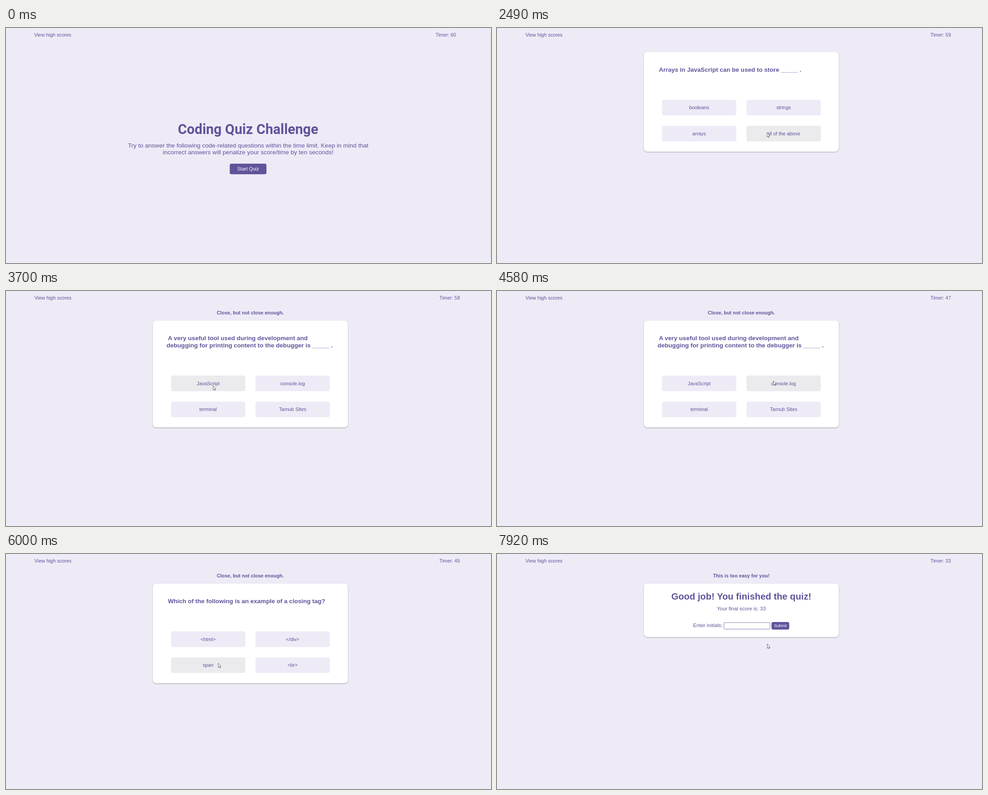
Animation, 1074 px wide and 521 px high, one loop 7.99 s. Source, as an HTML page:

```html
<!DOCTYPE html>
<html lang="en">
<head>
<meta charset="utf-8">
<title>Coding Quiz</title>
<style>
  html, body { margin: 0; width: 100%; height: 100%; overflow: hidden; background: #eeebf7; }
  svg { display: block; width: 1074px; height: 521px; font: 10.88px "Liberation Sans", Arial, sans-serif; fill: #61539a; }
  .bold { font-weight: 700; }
  .mid { text-anchor: middle; }
  .title { font: 700 30.5px Roboto, "Liberation Sans", sans-serif; }
  .intro, .question { font-size: 13.55px; }
  .done { font-size: 20.3px; }
  .form { font-size: 11.4px; }
  .submit { font-size: 9.07px; }
  .white, .card { fill: #fff; }
  .card { filter: drop-shadow(0 1px 1.2px rgba(0, 0, 0, .32)); }
  .answer { fill: #eeebf7; }
  .answer.hover { fill: #ebebed; }
  .input { fill: #fff; stroke: #8379ad; }
</style>
</head>
<body>
<svg id="stage" viewBox="0 0 1074 521">
  <g id="scene"></g>
  <text id="timer" y="18.7"></text>
  <path id="cursor" d="M0 0V9.6L2.2 7.5L3.7 10.8L5 10.2L3.6 7.1H6.3Z" fill="#fff" stroke="#55515f" stroke-width=".85"/>
</svg>
<script>
const LOOP = 7990;
const BUTTON = { w: 164.5, h: 34.6, xs: [365.4, 552.4], pitch: 57.6 };

const scenes = [
  { at: 0, kind: "start" },
  { at: 1150, lines: ["Arrays in JavaScript can be used to store _____ ."],
    answers: ["booleans", "strings", "arrays", "all of the above"] },
  { at: 2570, message: "This is too easy for you!",
    lines: ["String values must be enclosed within _____", "when being assigned to variables."],
    answers: ["commas", "curly brackets", "quotes", "parentheses"] },
  { at: 3700, message: "Close, but not close enough.",
    lines: ["A very useful tool used during development and", "debugging for printing content to the debugger is _____ ."],
    answers: ["JavaScript", "console.log", "terminal", "Tarnub Sites"] },
  { at: 4960, message: "You're making Web Dev look easy!",
    lines: ["How often should you commit changes to your code?"],
    answers: ["early and often", "never", "once a month", "twice a week"] },
  { at: 6000, message: "Close, but not close enough.",
    lines: ["Which of the following is an example of a closing tag?"],
    answers: ["<html>", "</div>", "span", "<br>"] },
  { at: 7340, kind: "end", message: "This is too easy for you!" }
];

// [time, seconds left]
const ticks = [[0, 60], [2010, 59], [2970, 58], [3960, 47], [4960, 46], [6000, 45], [6950, 34], [7915, 33]];

// [time, x, y] of the pointer tip
const path = [
  [670, 586, 246], [990, 543, 306], [1150, 543, 306], [1940, 592, 236], [2400, 598, 232],
  [2890, 598, 232], [3250, 520, 226], [3610, 458.5, 210], [3700, 458.5, 210], [3900, 468, 209],
  [4490, 609, 199], [4580, 612, 199], [4790, 635.5, 203], [4960, 635.5, 203], [5680, 487, 236],
  [5830, 470, 242], [6160, 470, 242], [6950, 577, 204], [7180, 611, 193], [7340, 611, 193],
  [7590, 590, 198], [7750, 590, 198], [7915, 598.5, 199.5]
];

const $ = id => document.getElementById(id);
const escapeText = s => s.replace(/&/g, "&amp;").replace(/</g, "&lt;");
const text = (s, x, y, cls = "") => `<text x="${x}" y="${y}" class="${cls}">${escapeText(s)}</text>`;
const box = (x, y, w, h, r, cls = "") =>
  `<rect x="${x}" y="${y}" width="${w}" height="${h}" rx="${r}" class="${cls}"/>`;
const lastBefore = (list, t, time) => list.filter(item => time(item) <= t).pop();

function startPage() {
  return text("View high scores", 62.4, 18.7)
    + text("Coding Quiz Challenge", 536, 234.5, "title mid")
    + text("Try to answer the following code-related questions within the time limit. Keep in mind that", 536.2, 264.6, "intro mid")
    + text("incorrect answers will penalize your score/time by ten seconds!", 536.2, 280.4, "intro mid")
    + box(495.5, 300.7, 81.3, 23.5, 4)
    + text("Start Quiz", 536.3, 316.1, "white mid")
    + `<rect x="1073" y="10" width="1" height="500" fill="#d8d5e2"/>`;
}

const pageTop = message =>
  text("View high scores", 63, 18.7) + (message ? text(message, 541, 51.6, "bold mid") : "");

const cardTop = scene => scene.message ? 65.6 : 53.2;

function answerSpots(scene) {
  const top = cardTop(scene) + 90 + 16 * scene.lines.length;
  return scene.answers.map((label, i) =>
    ({ label, x: BUTTON.xs[i % 2], y: top + BUTTON.pitch * (i >> 1) }));
}

function hoveredAnswer(scene, tip) {
  if (!scene.answers || !tip) return -1;
  return answerSpots(scene).findIndex(({ x, y }) =>
    tip.x >= x && tip.x <= x + BUTTON.w && tip.y >= y && tip.y <= y + BUTTON.h);
}

function questionPage(scene, hovered) {
  const top = cardTop(scene);
  const question = scene.lines.map((line, i) =>
    text(line, i ? 355.5 : 358.4, top + 43.3 + 16 * i, "question bold")).join("");
  const answers = answerSpots(scene).map(({ label, x, y }, i) =>
    box(x, y, BUTTON.w, BUTTON.h, 4, i === hovered ? "answer hover" : "answer")
    + text(label, x + BUTTON.w / 2, y + 21.1, "mid")).join("");
  return pageTop(scene.message)
    + box(325, top, 432, 205 + 16 * scene.lines.length, 8, "card") + question + answers;
}

function endPage(scene) {
  return pageTop(scene.message)
    + box(325, 65.6, 432, 118.6, 8, "card")
    + text("Good job! You finished the quiz!", 541, 101, "done bold mid")
    + text("Your final score is: 33", 541, 125.4, "form mid")
    + text("Enter initials:", 434.2, 162.1, "form")
    + box(502.5, 152, 102, 14.5, 2, "input")
    + box(607.8, 150.8, 39.4, 16.6, 4)
    + text("Submit", 627.5, 162.2, "submit white mid");
}

function pointerAt(t) {
  if (t < path[0][0]) return null;
  const next = path.findIndex(p => p[0] > t);
  const [t1, x1, y1] = next < 0 ? path[path.length - 1] : path[next];
  if (next < 0) return { x: x1, y: y1 };
  const [t0, x0, y0] = path[next - 1];
  const k = (t - t0) / (t1 - t0);
  return { x: x0 + (x1 - x0) * k, y: y0 + (y1 - y0) * k };
}

let shown = "";

function render(t) {
  const scene = lastBefore(scenes, t, s => s.at);
  const tip = pointerAt(t);
  const hovered = hoveredAnswer(scene, tip);
  const key = scene.at + ":" + hovered;
  if (key !== shown) {
    shown = key;
    $("scene").innerHTML = scene.kind === "start" ? startPage()
      : scene.kind === "end" ? endPage(scene)
      : questionPage(scene, hovered);
  }
  $("timer").setAttribute("x", scene.kind === "start" ? 951.2 : 959.7);
  $("timer").textContent = "Timer: " + lastBefore(ticks, t, tick => tick[0])[1];
  $("cursor").style.display = tip ? "" : "none";
  if (tip) $("cursor").setAttribute("transform", `translate(${tip.x} ${tip.y})`);
}

const began = performance.now();
function frame() {
  render((performance.now() - began) % LOOP);
  requestAnimationFrame(frame);
}
frame();
</script>
</body>
</html>
```
